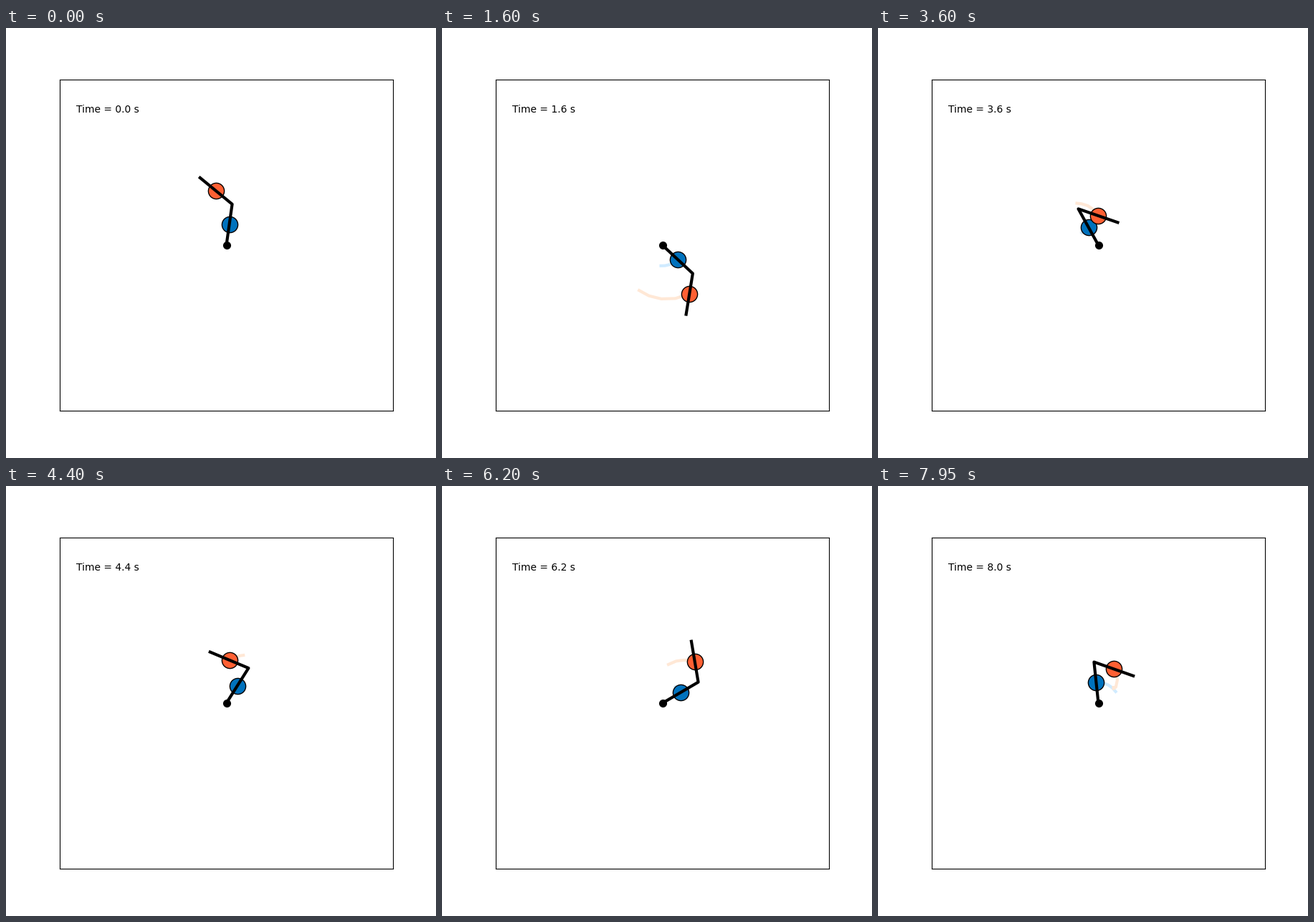
Write a matplotlib script that moves like this. It is 600 px wide and 600 px high and loops after 8000 ms.

```python
import numpy as np
import matplotlib.pyplot as plt
from matplotlib.animation import FuncAnimation

STEP = 0.05      # seconds per frame
FRAMES = 160
TAIL = 4         # trail length in frames

# Turning points of each rod: time (s), angle (degrees clockwise from up)
INNER = [(0, 8), (0.72, 168), (0.8, 163), (1.15, 210), (2.24, -0.5)]
OUTER = [(0.42, -50.4), (1.096, 311.6), (2, 104)]

# Later both rods turn together: time, inner angle, outer angle
SWINGS = [(2.74, 42, 325), (3.34, -54.6, 30), (4.1, 44, 332),
          (5.379, -47.8, 30), (6.267, 61, 355), (6.5, 61, 345),
          (7.1, -50, 50), (7.62, 72, 285), (8.15, -41.4, 30)]


def swing(t, turns):
    """Cosine easing from one turning point to the next."""
    when, angle = np.array(turns, float).T
    k = np.clip(np.searchsorted(when, t, side="right") - 1, 0, len(when) - 2)
    u = np.clip((t - when[k]) / (when[k + 1] - when[k]), 0, 1)
    return angle[k] + (angle[k + 1] - angle[k]) * (1 - np.cos(np.pi * u)) / 2


def rod(t, turns):
    angle = np.radians(swing(t, turns))
    return np.column_stack([np.sin(angle), np.cos(angle)])


times = np.arange(FRAMES) * STEP
inner = rod(times, INNER + [(t, a) for t, a, _ in SWINGS])
outer = rod(times, OUTER + [(t, b) for t, _, b in SWINGS])
joint, tip = inner, inner + outer
mass1, mass2 = inner / 2, inner + outer / 2

fig, ax = plt.subplots(figsize=(6, 6), dpi=100)
ax.set(xlim=(-4, 4), ylim=(-4, 4), xticks=[], yticks=[])


def trail(color):
    return ax.plot([], [], color=color, lw=3, zorder=2)[0]


def disk(color, size, z):
    return ax.plot([0], [0], "o", ms=size, mfc=color, mec="black", mew=1,
                   zorder=z)[0]


trail1, trail2 = trail("#d0ebff"), trail("#ffe8d6")
disk1, disk2 = disk("#0072bd", 16, 3), disk("#ff6033", 16, 4)
rods, = ax.plot([], [], color="black", lw=3, zorder=5)
disk("black", 7, 6)
label = ax.text(0.05, 0.9, "", transform=ax.transAxes, fontsize=10)


def draw(i):
    past = slice(max(0, i - TAIL), i + 1)
    for line, dot, path in ((trail1, disk1, mass1), (trail2, disk2, mass2)):
        line.set_data(path[past, 0], path[past, 1])
        dot.set_data(path[i:i + 1, 0], path[i:i + 1, 1])
    rods.set_data([0, joint[i, 0], tip[i, 0]], [0, joint[i, 1], tip[i, 1]])
    label.set_text(f"Time = {i * STEP:.1f} s")
    return trail1, trail2, disk1, disk2, rods, label


anim = FuncAnimation(fig, draw, frames=FRAMES, interval=50, repeat=True,
                     repeat_delay=0)
plt.show()
```
